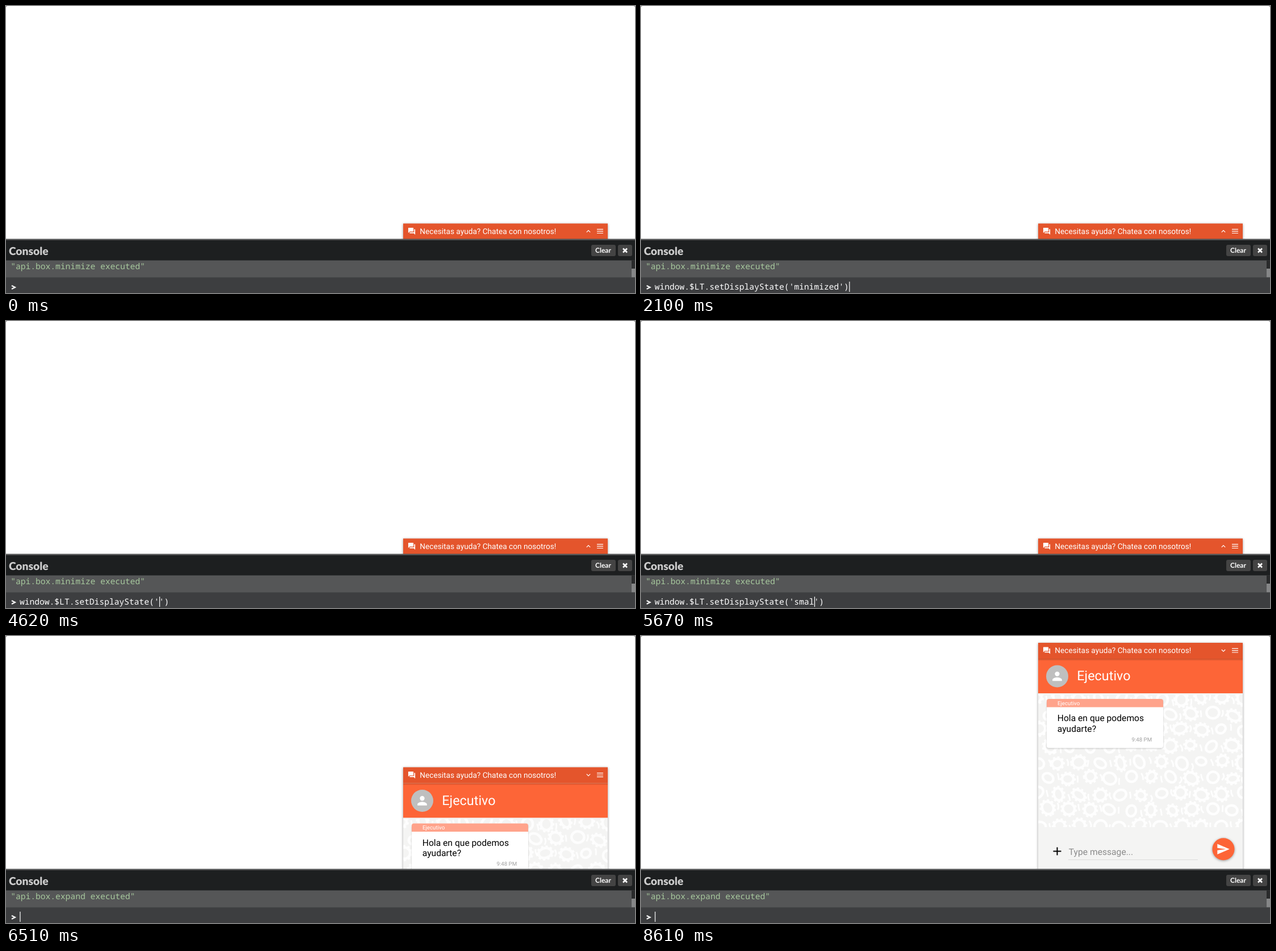
An HTML page that plays this animation: 1107 by 506 pixels, repeating every 8750 ms.

```html
<!DOCTYPE html>
<html lang="es">
<head>
<meta charset="utf-8">
<title>Chat display state</title>
<style>
  html, body { margin: 0; width: 100%; height: 100%; overflow: hidden; background: #888; }
  svg { display: block; width: 1107px; height: 506px; text-rendering: geometricPrecision; }
  text { white-space: pre; fill: #fff; font-family: Roboto, sans-serif; }
  .lato { font-family: Lato, sans-serif; font-weight: 700; }
  .mono { font: 500 14.617px "Noto Sans Mono", monospace; }
  .line { fill: none; stroke: #fff; stroke-width: 1.2; }
  .lift { filter: drop-shadow(0 1px 2px #0006); }
</style>
</head>
<body>
<svg viewBox="0 0 1107 506">
  <defs>
    <linearGradient id="shade" x2="0" y2="1">
      <stop stop-color="#0003"/><stop offset="1" stop-color="#0000"/>
    </linearGradient>
    <clipPath id="wall"><path d="M0 91H360V325H0z"/></clipPath>
  </defs>
  <rect width="1107" height="520" rx="3" fill="#fff"/>

  <g id="chat">
    <rect class="lift" width="360" height="410" fill="#f4f4f3"/>
    <g id="rings" clip-path="url(#wall)" fill="none" stroke="#fff" stroke-opacity=".85"></g>

    <rect y="28" width="360" height="61" fill="#fd6537"/>
    <rect y="28" width="360" height="4" fill="url(#shade)"/>
    <circle cx="33.5" cy="59" r="19.5" fill="#bfbfbf"/>
    <path transform="translate(21 46.5) scale(1.04)" fill="#fff" d="M12 12a4 4 0 1 0 0-8 4 4 0 0 0 0 8zm0 2c-2.67 0-8 1.34-8 4v2h16v-2c0-2.66-5.33-4-8-4z"/>
    <text x="68.3" y="66.2" font-size="23.4">Ejecutivo</text>

    <rect width="360" height="28" fill="#e4552c"/>
    <path transform="translate(7.7 6.3) scale(.61)" fill="#fff" d="M21 6h-2v9H6v2q0 1 1 1h11l4 4V7q0-1-1-1zm-4 6V3q0-1-1-1H3Q2 2 2 3v14l4-4h10q1 0 1-1z"/>
    <text x="29.3" y="18.4" font-size="13.67">Necesitas ayuda? Chatea con nosotros!</text>
    <path id="chevron" class="line"/>
    <path class="line" d="M341 10.2h11m-11 3.4h11m-11 3.4h11"/>

    <rect x="15" y="99" width="205" height="86.5" rx="4" fill="#fff" style="filter:drop-shadow(0 1px 1px #0003)"/>
    <path d="M15 113.5V103q0-4 4-4H216q4 0 4 4V113.5z" fill="#ffa38b"/>
    <text x="33.9" y="110" font-size="9.77">Ejecutivo</text>
    <g font-size="15.65">
      <text x="33.8" y="138.4" style="fill:#000">Hola en que podemos</text>
      <text x="33.8" y="156.8" style="fill:#000">ayudarte?</text>
      <text x="53.8" y="373.6" style="fill:#8b8b8b">Type message...</text>
    </g>
    <text x="164.5" y="174" font-size="9.7" style="fill:#a0a0a0">9:48 PM</text>

    <path d="M26.5 367.5h14m-7-7v14" class="line" style="stroke:#000;stroke-width:2"/>
    <path d="M53 382.5h228" class="line" style="stroke:#dcdcdc;stroke-width:1"/>
    <circle class="lift" cx="326" cy="363.7" r="19.5" fill="#fd6537"/>
    <path transform="translate(313.3 351.5) scale(1.02)" fill="#fff" d="M2 21L23 12 2 3v7l15 2-15 2z"/>
  </g>

  <rect y="410.5" width="1107" height="96" fill="#555657"/>
  <rect y="413" width="1107" height="35.5" fill="#1d1f20"/>
  <rect x="1101" y="448.5" width="6" height="15" fill="#292a2b"/>
  <rect x="1101" y="463" width="6" height="15.5" fill="#858687"/>
  <rect y="478.5" width="1107" height="28" fill="#3d3e40"/>
  <text class="lato" x="5" y="439" font-size="19.2" style="fill:#ccc;font-weight:900">Console</text>
  <rect x="1030" y="421" width="43" height="20" rx="3" fill="#444"/>
  <text class="lato" x="1037" y="435.3" font-size="12">Clear</text>
  <rect x="1077" y="421" width="25" height="20" rx="3" fill="#444"/>
  <path class="line" style="stroke-width:2.6" d="M1086 427.5l7 7m0-7l-7 7"/>
  <text class="mono" id="output" x="8.2" y="464" style="fill:#a7c89d"></text>
  <path class="line" style="stroke-width:2" d="M10 493l6 3-6 3"/>
  <text class="mono" id="input" x="24" y="500"></text>
  <rect id="caret" y="486" width="1.2" height="18" fill="#fff"/>
</svg>
<script>
const LOOP = 8750, CHAR = 8.77;
const RECALL = 1890, ENTER = 6230, SLIDE = 6290, SLIDE_TIME = 500;
const CLOSED = 383.5, OPEN = 12;
const arrows = [2310, 2520];
const deletes = [3010, 3220, 3400, 3570, 3745, 3990, 4165, 4350, 4550];
const letters = [5040, 5250, 5460, 5670, 5850];
const el = id => document.getElementById(id);
const done = (times, t) => times.filter(x => x <= t).length;

// Wallpaper: jittered rows of wobbly rings, some with a fringe
let seed = 11;
const rnd = (a, b) => a + (b - a) * ((seed = seed * 16807 % 2147483647) / 2147483647);
let rings = '';
for (let row = 0; row < 9; row++) {
  for (let col = 0; col < 11; col++) {
    const x = col * 36 + (row % 2) * 18 + rnd(-3, 3), y = 98 + row * 28 + rnd(-3, 3);
    const rx = rnd(8, 12), ry = rnd(7, 11), turn = rnd(0, 180);
    const ring = (grow, style) => `<ellipse cx="${x}" cy="${y}" rx="${rx + grow}" ry="${ry + grow}"
      transform="rotate(${turn} ${x} ${y})" ${style}/>`;
    rings += ring(0, 'stroke-width="4.5"');
    if (rnd(0, 1) < .6) rings += ring(3, 'stroke-width="3" stroke-dasharray="4 4"');
    rings += `<path d="M${x + 17} ${y + rnd(-9, 0)}q${rnd(-3, 6)} 6 ${rnd(-2, 5)} 12" stroke-width="3"/>`;
  }
}
el('rings').innerHTML = rings;

function command(t) {
  if (t < RECALL || t >= ENTER) return '';
  const word = 'minimized'.slice(0, 9 - done(deletes, t)) + 'small'.slice(0, done(letters, t));
  return `window.$LT.setDisplayState('${word}')`;
}

function caretOn(t) {
  if (t < RECALL) return t >= 210 && t < 700 || t >= 1190;
  return t < 6470 || (t - 6470) % 1000 < 500;
}

function draw(t) {
  const p = Math.min(1, Math.max(0, (t - SLIDE) / SLIDE_TIME));
  const eased = .5 - .5 * Math.cos(Math.PI * p);
  el('chat').setAttribute('transform', `translate(699 ${CLOSED + (OPEN - CLOSED) * eased})`);
  el('chevron').setAttribute('d', p > 0 ? 'M322.8 12l3.2 3.2 3.2-3.2' : 'M322.8 15.3l3.2-3.2 3.2 3.2');

  const text = command(t);
  el('input').textContent = text;
  el('output').textContent = `"api.box.${t < ENTER ? 'minimize' : 'expand'} executed"`;
  const column = text ? text.length - done(arrows, t) : 0;
  el('caret').setAttribute('x', 24.3 + column * CHAR);
  el('caret').setAttribute('visibility', caretOn(t) ? 'visible' : 'hidden');
}

const start = performance.now();
function tick() {
  draw((performance.now() - start) % LOOP);
  requestAnimationFrame(tick);
}
tick();
</script>
</body>
</html>
```
